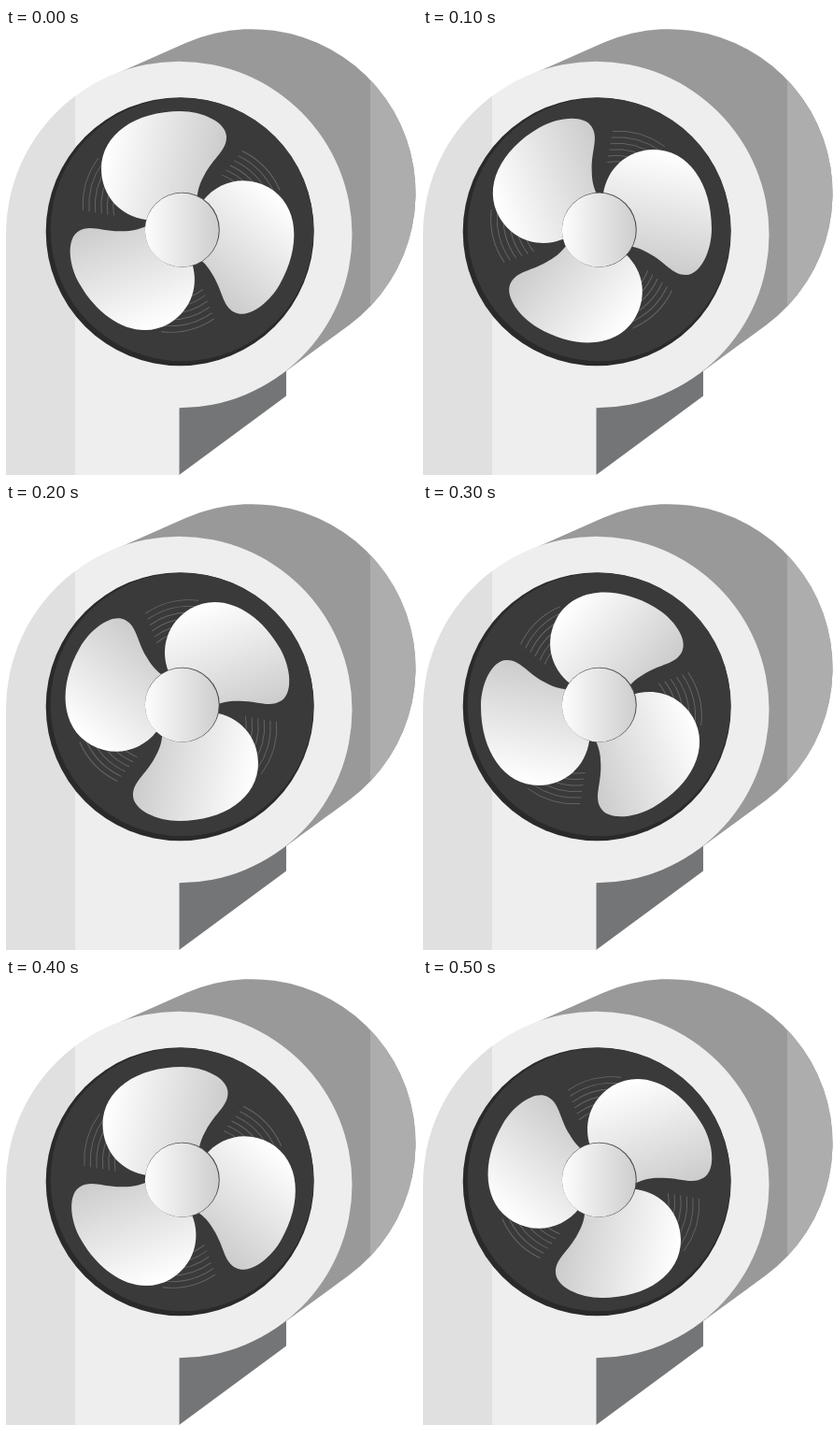
Animation, 440 px wide and 478 px high, one loop 600 ms. Source, as an HTML page:

```html
<!DOCTYPE html>
<html lang="en">
<head>
<meta charset="utf-8">
<title>Fan</title>
<style>
html, body { margin: 0; width: 100%; height: 100%; overflow: hidden; background: #fff; }
svg { display: block; width: 100%; height: 100%; }
</style>
</head>
<body>
<svg viewBox="0 0 440 478">
  <defs>
    <linearGradient id="bladeFill" gradientUnits="userSpaceOnUse" x1="-81" y1="-77" x2="45" y2="-54">
      <stop offset="0" stop-color="#fff"/><stop offset="1" stop-color="#cbcbcb"/>
    </linearGradient>
    <linearGradient id="hubFill">
      <stop offset="0" stop-color="#fdfdfd"/><stop offset="1" stop-color="#cecece"/>
    </linearGradient>
    <path id="barrel" d="M106 54.2 L193 15.7 A175.5 175.5 0 0 1 367 318 L295 370.5Z"/>
    <path id="front" d="M0 478 V221 A185.25 185.25 0 1 1 185.25 406.25 V478Z"/>
    <clipPath id="rightSide"><path d="M390 0H440V478H390Z"/></clipPath>
    <clipPath id="leftSide"><path d="M0 0H74V478H0Z"/></clipPath>
    <g id="sector">
      <path id="trails" fill="none" stroke="#686868" stroke-width=".9"/>
      <path fill="url(#bladeFill)" d="M-24 -6 L-36.5 -7.5 C-63.5 -11.5 -83.5 -32.5 -84 -61.5 C-84 -99 -47 -123.5 .5 -123.5 C25 -123.5 49.5 -111.5 50 -96.5 C50.5 -81.5 36.5 -74.5 26.5 -55.5 C21.5 -46.5 19.5 -40.5 18.5 -30.5Z"/>
    </g>
  </defs>

  <path fill="#737577" d="M185.3 400 L300 360 V393.5 L185.3 478Z"/>
  <use href="#barrel" fill="#999"/>
  <use href="#barrel" fill="#adadad" clip-path="url(#rightSide)"/>
  <use href="#front" fill="#eee"/>
  <use href="#front" fill="#e0e0e0" clip-path="url(#leftSide)"/>
  <circle cx="186.2" cy="217.7" r="143.5" fill="#2a2a2a"/>
  <circle cx="188.5" cy="215.5" r="140.8" fill="#3a3a3a"/>

  <g id="rotor">
    <use href="#sector"/>
    <use href="#sector" transform="rotate(120)"/>
    <use href="#sector" transform="rotate(240)"/>
  </g>

  <circle cx="188.8" cy="215.8" r="40" fill="#4a4a4a"/>
  <circle cx="188.3" cy="216.1" r="39.5" fill="url(#hubFill)"/>
</svg>
<script>
const rotor = document.getElementById('rotor');
const STEP = 100;

// Each pose: turn in degrees, then the slightly wobbling axle position
const poses = [
  [0, 186, 212.5],
  [-30, 185.5, 214],
  [-60, 186, 216.5],
  [-90, 185.5, 218],
  [-120, 187.5, 218.5],
  [-180, 192, 218.5]
];

const polar = (r, deg) => {
  const a = deg * Math.PI / 180;
  return `${r * Math.cos(a)} ${r * Math.sin(a)}`;
};

// Speed lines in the gap ahead of each blade
let lines = '';
for (let r = 105; r > 67; r -= 6.7) {
  lines += `M${polar(r, 189.5)}A${r * .8} ${r * .8} 0 0 1 ${polar(r + 9, 220)}`;
}
document.getElementById('trails').setAttribute('d', lines);

function draw(now) {
  const [turn, x, y] = poses[Math.floor(now / STEP) % poses.length];
  rotor.setAttribute('transform', `translate(${x} ${y}) rotate(${turn})`);
}

const start = performance.now();
function tick() {
  draw(performance.now() - start);
  requestAnimationFrame(tick);
}
tick();
</script>
</body>
</html>
```
